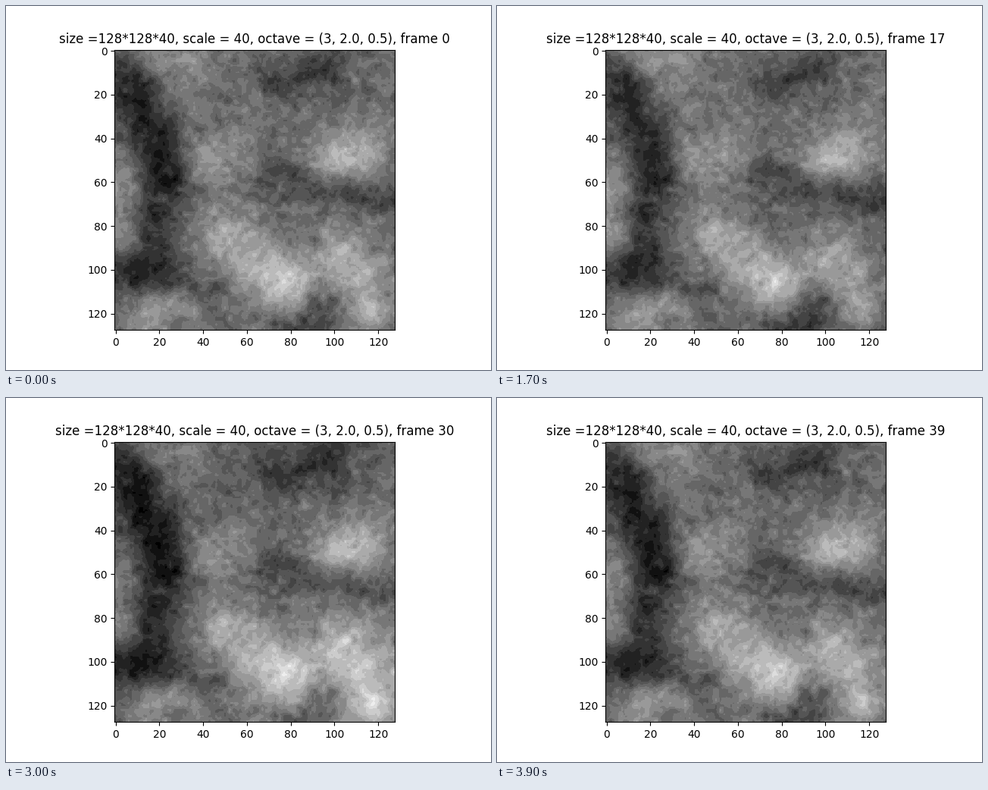
These frames come from a looping animation (640x480 px, 4 s). A matplotlib script:

```python
import numpy as np
import matplotlib.pyplot as plt
from matplotlib.animation import FuncAnimation

SIZE, FRAMES = 128, 40
GREY = 110
rng = np.random.default_rng(7)
yy, xx = np.mgrid[:SIZE, :SIZE]

# Soft brush strokes: start, end, width, brightness
STROKES = [
    ((6, 12), (24, 56), 8, -72),
    ((18, 74), (15, 94), 9, -52),
    ((2, 103), (42, 109), 7, -38),
    ((76, 14), (95, 9), 7, -48),
    ((70, 57), (124, 68), 6, -38),
    ((88, 124), (93, 120), 8, -42),
    ((99, 50), (110, 46), 8, 68),
    ((43, 50), (54, 48), 9, 34),
    ((15, 2), (30, 6), 8, 36),
    ((2, 60), (4, 86), 6, 32),
    ((50, 86), (76, 106), 9, 60),
    ((82, 104), (104, 90), 8, 36),
    ((112, 104), (114, 118), 9, 54),
    ((18, 122), (28, 116), 8, 40),
]


def stroke(start, end, width, amount):
    """A straight line with a Gaussian falloff around it."""
    (x0, y0), (x1, y1) = start, end
    dx, dy = x1 - x0, y1 - y0
    along = ((xx - x0) * dx + (yy - y0) * dy) / (dx**2 + dy**2)
    along = np.clip(along, 0, 1)
    dist2 = (xx - x0 - along * dx)**2 + (yy - y0 - along * dy)**2
    return amount * np.exp(-dist2 / (2 * width**2))


def smooth_noise(cells):
    """Random lattice values blended with an eased step."""
    grid = rng.normal(size=(cells + 1, cells + 1))
    pos = np.linspace(0, cells, SIZE)
    cell = np.minimum(pos.astype(int), cells - 1)
    u = pos - cell
    ease = u * u * (3 - 2 * u)
    rows = grid[cell] + ease[:, None] * (grid[cell + 1] - grid[cell])
    return rows[:, cell] + ease * (rows[:, cell + 1] - rows[:, cell])


def texture():
    return sum(amp * smooth_noise(cells)
               for cells, amp in ((14, 5), (28, 8), (56, 8), (110, 6)))


base = GREY + sum(stroke(*s) for s in STROKES) + texture()

# Left side and lower right corner swing in opposite directions
tilt = 55 * (xx / SIZE) * (yy / SIZE) - 14
drift_cos, drift_sin = 0.35 * texture(), 0.35 * texture()


def cloud(i):
    a = 2 * np.pi * i / FRAMES
    shimmer = np.cos(a) * drift_cos + np.sin(a) * drift_sin
    return np.clip(base + shimmer - np.sin(a) * tilt, 0, 255)


def caption(i):
    return f"size =128*128*40, scale = 40, octave = (3, 2.0, 0.5), frame {i}"


fig, ax = plt.subplots(figsize=(6.4, 4.8), dpi=100)
image = ax.imshow(cloud(0), cmap=plt.get_cmap("gray", 16), vmin=0, vmax=255)
title = ax.set_title(caption(0))


def update(i):
    image.set_data(cloud(i))
    title.set_text(caption(i))
    return image, title


anim = FuncAnimation(fig, update, frames=FRAMES, interval=100,
                     repeat=True, repeat_delay=0, blit=False)
plt.show()
```
